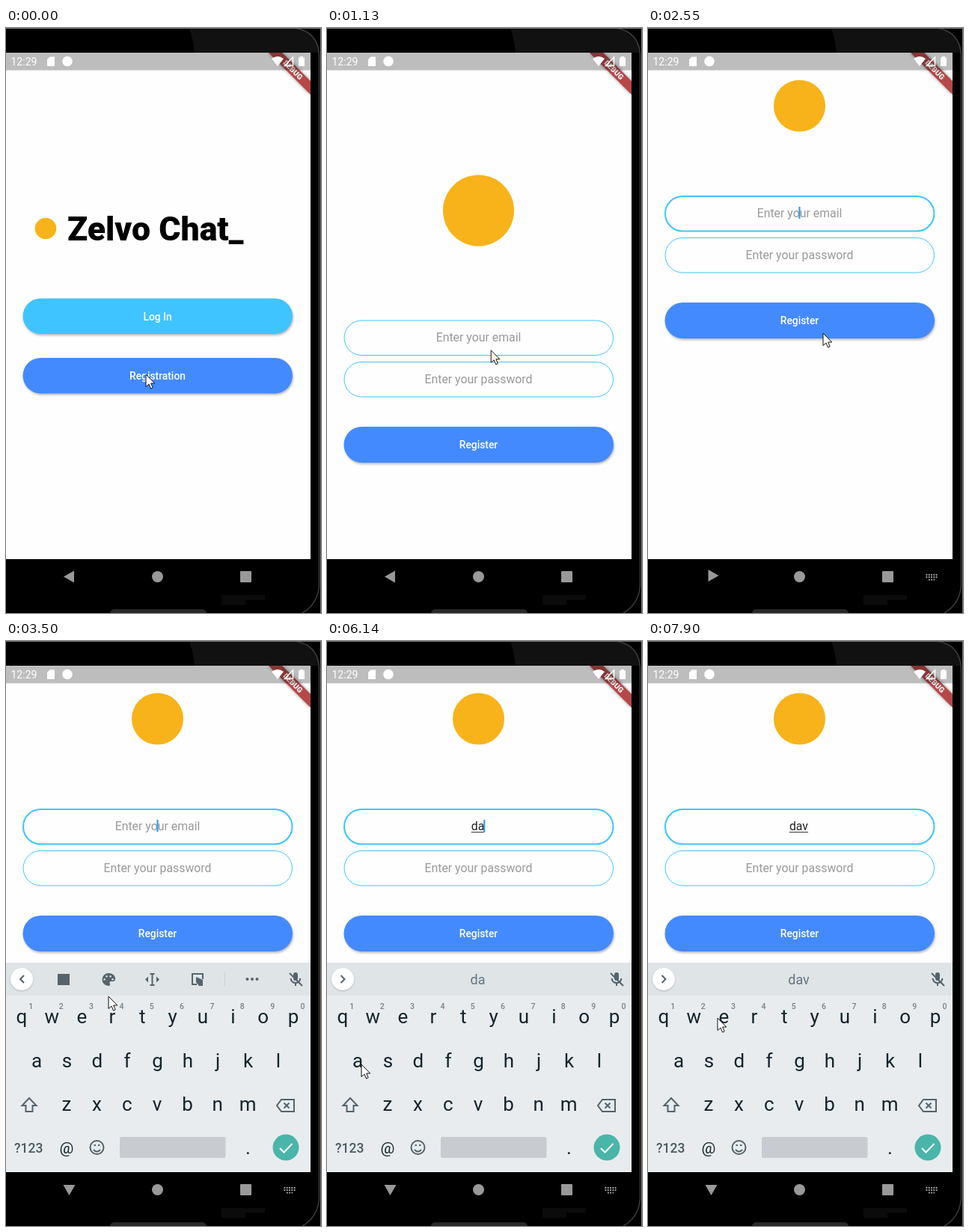
These frames come from a looping animation (421x782 px, 8000 ms). An HTML page:

```html
<!DOCTYPE html>
<html lang="en">
<head>
<meta charset="utf-8">
<title>Chat sign-up</title>
<style>
html, body { margin: 0; width: 100%; height: 100%; overflow: hidden; background: #000; }
svg { display: block; font-family: Roboto, sans-serif; }
.mid { text-anchor: middle; }
.button { filter: drop-shadow(1px 2.5px 1.5px rgba(0,0,0,.28)); }
.label { font-size: 13.8px; font-weight: 500; fill: #fff; text-anchor: middle; }
.field { fill: none; stroke: #40c4ff; }
.hint { font-size: 15.85px; fill: #999; text-anchor: middle; }
.key { font-size: 26px; fill: #14242b; text-anchor: middle; }
.digit { font-size: 10.5px; font-weight: 500; fill: #76828a; text-anchor: middle; }
.line { fill: none; stroke: #56636a; stroke-width: 2; }
.icon { fill: #56636a; }
</style>
</head>
<body>
<svg width="421" height="782" viewBox="0 0 421 782">
  <defs>
    <clipPath id="screen"><rect y="33" width="407" height="677"/></clipPath>
    <clipPath id="pill"><rect x="22.5" y="441" width="360.500" height="47.500" rx="23.700"/></clipPath>
  </defs>

  <!-- phone body -->
  <rect width="421" height="782"/>
  <path d="M245 0H386Q416 4 419 33H252Q250 14 245 0Z" fill="#111"/>
  <path d="M288 758h58v6h-26v7h-32z" fill="#0b0b0b"/>
  <path d="M386 0Q417 5 418.500 36V746Q416 771 396 782" fill="none" stroke="#3c3c3c" stroke-width="1.500"/>
  <path d="M0 .5H421M420.500 0V782" stroke="#777"/>
  <path d="M139 782q1-5 6-5h117q5 0 6 5z" fill="#292929"/>

  <g clip-path="url(#screen)">
    <rect y="33" width="407" height="677" fill="#fefefe"/>
    <text id="title" x="82" y="284" font-size="44.600" font-weight="900"></text>
    <rect class="button" x="22.5" y="361.500" width="360.500" height="47.500" rx="23.700" fill="#40c4ff"/>
    <text class="label" x="202.500" y="390.500">Log In</text>
    <rect class="button" x="22.5" y="441" width="360.500" height="47.500" rx="23.700" fill="#448aff"/>
    <rect id="ripple" y="443" height="44.500" rx="4" fill="#ccc" opacity=".2" clip-path="url(#pill)"/>
    <text class="label" x="202.500" y="469.500">Registration</text>

    <g id="form">
      <rect y="-133" width="407" height="1000" fill="#fefefe"/>
      <rect id="email" class="field" x="23" y="225" width="359.500" height="46.500" rx="23.200"/>
      <text id="emailText" x="202.500" y="253"></text>
      <path id="underline" stroke="#333"/>
      <rect id="caret" y="239" width="2" height="16" fill="#2196f3"/>
      <rect class="field" x="23" y="280.500" width="359.500" height="46.500" rx="23.200"/>
      <text class="hint" x="202.500" y="308.500">Enter your password</text>
      <rect class="button" x="22.5" y="367" width="360.500" height="48" rx="24" fill="#448aff"/>
      <text class="label" x="202.500" y="396">Register</text>
    </g>
    <circle id="logo" fill="#f8b31a"/>

    <g id="keyboard">
      <rect y="430" width="407" height="280" fill="#e8ecef"/>
      <rect y="430" width="407" height="44" fill="#dfe4e7"/>
      <circle cx="21" cy="452" r="15" fill="#fff" style="filter:drop-shadow(0 1px 1px rgba(0,0,0,.2))"/>
      <path id="chevron" class="line"/>
      <g id="tools">
        <rect class="icon" x="69" y="445" width="16" height="15"/>
        <path class="icon" fill-rule="evenodd" d="M137 444a8.500 8.500 0 1 0 0 17c3 0 2-3 1.500-4s.5-2 2-2h2.500c2 0 3-1.500 3-4 0-4-4-7-9-7zm-5.500 7a1.300 1.300 0 1 0 .1 0zm3-4a1.300 1.300 0 1 0 .1 0zm5 0a1.300 1.300 0 1 0 .1 0zm3 4a1.300 1.300 0 1 0 .1 0z"/>
        <path class="line" d="M192.500 445h6M192.500 460h6M195.500 445v15"/>
        <path class="icon" d="M190 448.500v8l-4-4zM201 448.500v8l4-4z"/>
        <path class="line" d="M263 452v-7h-14v14h6"/>
        <path class="icon" d="M254 449l9 4v8h-5l-4-5z"/>
        <path d="M292.500 442v20" stroke="#cbd1d5"/>
        <path class="icon" d="M320.500 452a2 2 0 1 0 4 0a2 2 0 1 0-4 0m6.500 0a2 2 0 1 0 4 0a2 2 0 1 0-4 0m6.500 0a2 2 0 1 0 4 0a2 2 0 1 0-4 0"/>
      </g>
      <text id="suggestion" class="mid" x="201.500" y="459" font-size="18" fill="#66737a"></text>
      <rect class="icon" x="384" y="443" width="6" height="11" rx="3"/>
      <path class="line" stroke-width="1.500" d="M380.500 451q1 6 6.500 6t6.500-6M387 457v4M379 444l17 17"/>
      <g id="keys"></g>
      <path class="line" d="M31 611l-9.500 10h5v8h9v-8h5z"/>
      <path class="line" d="M368 613h17v16h-17l-6-8zM371.500 617.500l7 7m0-7l-7 7"/>
      <text x="11" y="683.500" font-size="17.500" font-weight="500" fill="#4b5a62">?123</text>
      <text class="mid" x="81" y="685" font-size="21" fill="#14242b">@</text>
      <circle class="line" cx="121.500" cy="677" r="9"/>
      <path class="line" d="M117 680q4.500 5 9 0M117.500 674h2.500M123 674h2.500"/>
      <rect x="152" y="663" width="141.500" height="28" rx="2" fill="#c8ccd1"/>
      <text class="key" x="323.500" y="686">.</text>
      <circle cx="374" cy="677" r="17.500" fill="#4ab5a9"/>
      <path d="M366 678l5.500 5.500 11-11.500" fill="none" stroke="#fff" stroke-width="2.200"/>
      <g id="popup">
        <rect width="42" height="119" rx="3" fill="#d4d8db" style="filter:drop-shadow(0 1px 2px rgba(0,0,0,.4))"/>
        <text class="mid" x="21" y="39" font-size="26" fill="#46535a"></text>
      </g>
    </g>

    <!-- debug ribbon and status bar -->
    <path d="M351 33h18l38 38v18z" fill="#b64848" style="filter:drop-shadow(0 0 2px rgba(0,0,0,.45))"/>
    <text class="mid" transform="translate(381 58.500) rotate(45)" font-size="10" font-weight="900" fill="#fff">DEBUG</text>
    <rect y="33" width="407" height="23.500" fill="#000" opacity=".26"/>
  </g>
  <g fill="#fff">
    <text x="6.500" y="50" font-size="14">12:29</text>
    <path d="M58.500 38.500H65V51H55V42z"/>
    <circle cx="82" cy="44.500" r="6.800"/>
    <path d="M355 41q8-6 16 0l-8 10z"/>
    <path d="M383.500 39v11.500H372.500z" fill="none" stroke="#fff" stroke-width="1.500"/>
    <path d="M393 38h4v1.500h2V51h-8V39.500h2z"/>
  </g>

  <!-- navigation bar -->
  <g fill="#999">
    <path id="back" d="M-7.500 0L6.500-8V8z"/>
    <circle cx="202.500" cy="733.500" r="7.500"/>
    <rect x="313" y="726" width="15" height="15" rx="1"/>
    <path id="keyboardIcon" d="M371.500 731h15M371.500 734h15M375 737.500h8" stroke="#aaa" stroke-width="1.800" stroke-dasharray="1.800 1.500"/>
  </g>
  <path id="mouse" d="M0 0V16.500L4 13L6.500 19L9.200 17.800L6.700 12H11.800z" fill="#fff" stroke="#111"/>
</svg>

<script>
const LOOP = 8000;
const $ = id => document.getElementById(id);
const set = (id, attrs) => {
  for (const name in attrs) $(id).setAttribute(name, attrs[name]);
};
const show = (id, visible) => set(id, { visibility: visible ? 'visible' : 'hidden' });
const mix = (a, b, k) => a + (b - a) * k;
const clamp = x => Math.max(0, Math.min(1, x));

// Bursts of movement: start, end, number of pictures
const bursts = [
  [160, 290, 2], [570, 1400, 7], [2300, 3250, 8], [3380, 4340, 8],
  [4460, 5420, 8], [5590, 6570, 8], [6700, 7630, 7], [7770, 7900, 2]
];
const mousePath = [
  [0, 187, 463], [570, 187, 463], [708, 197, 465], [1400, 234, 408],
  [2436, 234, 408], [3250, 140, 473], [3517, 137, 475], [4340, 129, 529],
  [4740, 117, 560], [5170, 117, 560], [5730, 46, 566], [6150, 46, 566],
  [6570, 205, 620], [7100, 205, 620], [7630, 106, 522], [7900, 93, 504]
];
const FOCUS = 2300;
// Key presses: letter, down, up, key centre x, text baseline
const presses = [
  ['d', 4850, 5100, 121, 570], ['a', 5800, 6000, 41, 570], ['v', 6950, 7100, 202, 628]
];

$('keys').innerHTML = [['qwertyuiop', 20.8, 511], ['asdfghjkl', 41, 570], ['zxcvbnm', 81, 628]]
  .map(([letters, left, y], row) => [...letters].map((letter, i) => {
    const x = left + i * 40.36;
    const digit = row ? '' : `<text class="digit" x="${x + 12.5}" y="492">${(i + 1) % 10}</text>`;
    return `<text class="key" x="${x}" y="${y}">${letter}</text>${digit}`;
  }).join('')).join('');

function quantise(t) {
  const burst = bursts.findLast(([start]) => t >= start);
  if (!burst) return 0;
  const [start, end, count] = burst;
  const step = (end - start) / (count - 1);
  return start + step * Math.min(count - 1, Math.floor((t - start + 20) / step));
}

function along(path, t) {
  const next = path.findIndex(point => point[0] > t);
  if (next < 0) return path.at(-1).slice(1);
  const [a, b] = [path[next - 1], path[next]];
  const k = (t - a[0]) / (b[0] - a[0]);
  return [mix(a[1], b[1], k), mix(a[2], b[2], k)];
}

function drawPages(t) {
  const progress = clamp((t - 603) / 300);
  const eased = 1 - (1 - progress) ** 2;
  const raised = t > 2400;
  $('title').textContent = t < 160 ? 'Zelvo Chat_' : 'Zelvo Chat';

  const reach = t < 570 ? 0 : t < 700 ? 40 : 134;
  set('ripple', { x: 196 - reach, width: reach * 2 });

  const drop = raised ? 0 : 166 + 166 * (1 - eased);
  set('form', { transform: `translate(0 ${drop})`, opacity: progress ** 1.5 });
  set('email', { 'stroke-width': t >= FOCUS ? 2 : 1 });

  const size = raised ? 128 : mix(53, 176, eased ** 1.5);
  set('logo', {
    cx: mix(53, 202.5, eased ** 0.88),
    cy: raised ? 104 : mix(268, 244, eased ** 4),
    r: size * 0.27
  });
}

function drawTyping(t) {
  const done = presses.filter(press => t >= press[2]);
  const typed = done.map(press => press[0]).join('');
  const text = $('emailText');
  text.textContent = typed || 'Enter your email';
  set('emailText', { class: typed ? 'hint typed' : 'hint' });
  text.style.fill = typed ? '#222' : '';

  const half = typed ? text.getComputedTextLength() / 2 : 0;
  const center = typed ? 201.5 : 202.5;
  set('emailText', { x: center });
  set('underline', { d: typed ? `M${center - half} 255.500h${half * 2}` : '' });
  const since = done.length ? done.at(-1)[2] : FOCUS;
  set('caret', { x: center + half - 1 });
  show('caret', t >= FOCUS && Math.floor((t - since) / 500) % 2 === 0);

  show('tools', !typed);
  $('suggestion').textContent = typed;
  set('chevron', { d: typed ? 'M18.500 447l5 5-5 5' : 'M24 447l-5 5 5 5' });

  const held = presses.find(press => t >= press[1] && t < press[2]);
  set('popup', { display: held ? 'inline' : 'none' });
  if (held) {
    set('popup', { transform: `translate(${held[3] - 21} ${held[4] - 104})` });
    $('popup').lastElementChild.textContent = held[0];
  }
}

function drawSystem(t) {
  const rise = clamp((t - 2480) / 180);
  set('keyboard', {
    display: rise ? 'inline' : 'none',
    opacity: rise,
    transform: `translate(0 ${100 * (1 - rise)})`
  });
  const turn = t < 2400 ? 0 : t < 2500 ? 180 : 270;
  set('back', { transform: `translate(${turn === 180 ? 87 : 84.5} ${turn === 180 ? 732 : 733.5}) rotate(${turn})` });
  show('keyboardIcon', t > 2400);
  set('mouse', { transform: `translate(${along(mousePath, t)})` });
}

function frame() {
  const t = quantise(performance.now() % LOOP);
  drawPages(t);
  drawTyping(t);
  drawSystem(t);
  requestAnimationFrame(frame);
}
frame();
</script>
</body>
</html>
```
